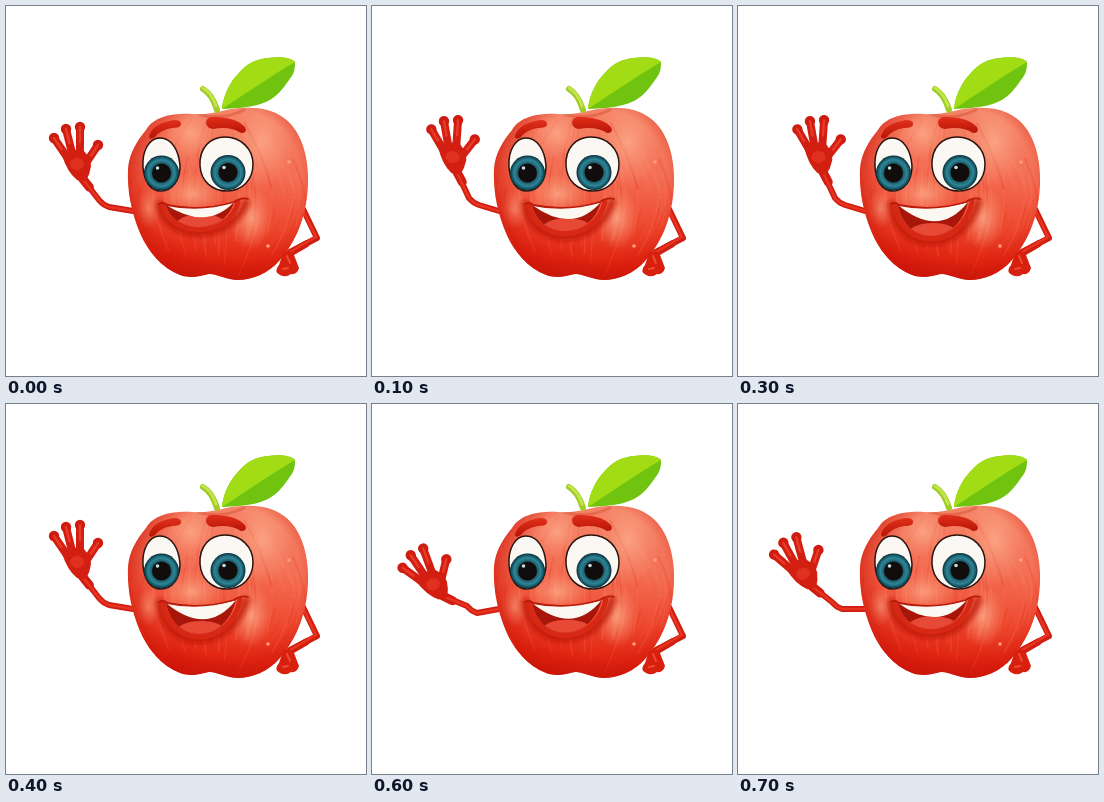
Animation, 360 px wide and 370 px high, one loop 0.8 s. Source, as an HTML page:

```html
<!DOCTYPE html>
<html lang="en">
<head>
<meta charset="utf-8">
<title>Waving apple</title>
<style>
html, body { margin: 0; width: 100%; height: 100%; overflow: hidden; background: #fff; }
svg { display: block; width: 360px; height: 370px; }
</style>
</head>
<body>
<svg viewBox="0 0 360 370" fill="none" stroke-linecap="round" stroke-linejoin="round">
  <defs>
    <linearGradient id="skin" x1=".55" y1="0" x2=".45" y2="1">
      <stop offset="0" stop-color="#f58468"/>
      <stop offset=".35" stop-color="#f36f55"/>
      <stop offset=".65" stop-color="#ee4a30"/>
      <stop offset=".88" stop-color="#e02410"/>
      <stop offset="1" stop-color="#c4150a"/>
    </linearGradient>
    <radialGradient id="edge" gradientUnits="userSpaceOnUse" cx="222" cy="176" r="106">
      <stop offset=".7" stop-color="#d81c0c" stop-opacity="0"/>
      <stop offset="1" stop-color="#cc1408" stop-opacity=".75"/>
    </radialGradient>
    <radialGradient id="glow">
      <stop offset="0" stop-color="#fbab8a" stop-opacity=".8"/>
      <stop offset="1" stop-color="#fb9b7a" stop-opacity="0"/>
    </radialGradient>
    <radialGradient id="iris">
      <stop offset=".5" stop-color="#16525f"/>
      <stop offset=".75" stop-color="#2f8596"/>
      <stop offset=".88" stop-color="#1b6070"/>
      <stop offset="1" stop-color="#082a33"/>
    </radialGradient>
    <linearGradient id="brow" x1="0" y1="0" x2="0" y2="1">
      <stop offset="0" stop-color="#e0301b"/>
      <stop offset="1" stop-color="#b81406"/>
    </linearGradient>
    <filter id="soft" x="-30%" y="-30%" width="160%" height="160%"><feGaussianBlur stdDeviation="2.500"/></filter>
    <path id="body" d="M140 124C148 110 168 107 186 108C198 109 206 107 216 105C238 100 262 100 278 112C297 126 303 154 302 178C301 206 293 232 274 254C262 268 246 274 232 274C220 274 212 268 203 268C194 270 185 273 174 269C156 262 142 246 134 227C125 206 121 184 122 163C123 148 130 136 140 124Z"/>
    <clipPath id="inBody"><use href="#body"/></clipPath>
    <clipPath id="inMouth"><path id="mouthClip"/></clipPath>
    <g id="eyeball">
      <circle r="17.500" fill="url(#iris)"/>
      <circle r="9.500" fill="#120d0d"/>
      <circle cx="-4" cy="-5" r="1.800" fill="#c4dfe2"/>
    </g>
  </defs>

  <!-- resting arm -->
  <path d="M297 203L311 232L284 246" stroke="#cf1f10" stroke-width="6"/>
  <path d="M300 238L281 249" stroke="#cf1f10" stroke-width="7"/>
  <path d="M297 204L310 231L284 246" stroke="#ea3420" stroke-width="2.500"/>

  <!-- waving arm -->
  <path id="arm" stroke="#d01d10" stroke-width="6"/>
  <path id="wrist" stroke="#d01d10" stroke-width="9"/>
  <path id="armLight" stroke="#e63322" stroke-width="2.500"/>
  <g id="hand"></g>

  <!-- leaf: light half over dark half -->
  <path d="M216 103C217 90 224 76 232 68C241 57 251 53 262 52C274 50 286 52 289 56C289 64 288 68 283 74C277 83 270 91 262 95C248 102 232 102 216 103Z" fill="#70c410"/>
  <path d="M216 103C217 90 224 76 232 68C241 57 251 53 262 52C274 50 286 52 289 56C268 68 245 84 216 103Z" fill="#a2dc14"/>

  <use href="#body" fill="url(#skin)"/>
  <g clip-path="url(#inBody)">
    <g id="streaks"></g>
    <ellipse cx="256" cy="136" rx="32" ry="45" fill="url(#glow)"/>
    <ellipse cx="185" cy="128" rx="26" ry="26" fill="url(#glow)"/>
    <ellipse cx="186" cy="188" rx="32" ry="22" fill="url(#glow)"/>
    <ellipse cx="245" cy="212" rx="22" ry="32" fill="url(#glow)"/>
    <ellipse cx="142" cy="203" rx="13" ry="20" fill="url(#glow)"/>
    <use href="#body" fill="url(#edge)"/>
    <path d="M190 107Q212 116 238 104" stroke="#c83d20" stroke-opacity=".35" stroke-width="3"/>
  </g>
  <path d="M197 83Q206 88 211 104" stroke="#a0cc28" stroke-width="6"/>
  <path d="M197 82Q206 87 210 100" stroke="#c2e44c" stroke-width="3"/>
  <g fill="#ff9c82">
    <circle cx="283" cy="156" r="1.800"/><circle cx="262" cy="240" r="1.800"/>
  </g>

  <!-- fist on the hip -->
  <path d="M277 247Q284 243 288 249L293 262Q291 269 285 268Q280 272 274 269Q267 266 273 259Z" fill="#d8200f"/>
  <path d="M277 263L282 262M281 250L284 257" stroke="#ee4a34" stroke-width="2"/>

  <!-- brows -->
  <path d="M143 130Q147 117 168 114Q176 114 175 119Q174 122 166 122Q154 124 149 131Q143 135 143 130Z" fill="url(#brow)"/>
  <path d="M200 116Q201 110 211 111Q231 112 239 121Q242 127 235 127Q224 120 207 123Q200 122 200 116Z" fill="url(#brow)"/>

  <!-- eyes -->
  <g fill="#fbf8f3" stroke="#2a120d" stroke-width="1.500">
    <path d="M137 161C136 145 143 132 154 132C166 132 173 145 174 160C174 175 166 185 155 185C144 185 138 175 137 161Z"/>
    <path d="M194 160C193 142 204 131 219 131C235 131 247 143 247 158C247 174 236 185 221 185C206 185 195 175 194 160Z"/>
  </g>
  <use href="#eyeball" x="155.500" y="167"/>
  <use href="#eyeball" x="222" y="166.500"/>

  <!-- mouth -->
  <g filter="url(#soft)">
    <path id="shade" stroke="#bb1405" stroke-opacity=".8" stroke-width="7"/>
  </g>
  <path id="lip" stroke="#d62814" stroke-width="5"/>
  <g clip-path="url(#inMouth)">
    <rect x="150" y="185" width="95" height="55" fill="#a81509"/>
    <ellipse id="tongue" cx="195" rx="25" ry="11" fill="#e64a37"/>
    <path id="teeth" fill="#fbf8f2"/>
  </g>
  <path d="M153 198Q157 195 161 199Q194 206 228 196Q235 191 242 193" stroke="#b81a0c" stroke-width="1.800"/>
</svg>
<script>
const $ = id => document.getElementById(id);
const set = (id, attrs) => { for (const k in attrs) $(id).setAttribute(k, attrs[k]); };

// Hand, drawn around the middle of the palm
const tips = [[-24, -26], [-12, -35], [2, -37], [20, -19]];
const roots = [[-9, -4], [-5, -7], [2, -7], [6, 2]];
const finger = ([x, y], i) => {
  const [a, b] = roots[i];
  return `<path d="M${a} ${b}L${x} ${y}" stroke="#d21f12" stroke-width="8"/>
    <circle cx="${x}" cy="${y}" r="5.2" fill="#cf1c10"/>
    <path d="M${(a + x) / 2} ${(b + y) / 2}L${x} ${y}" stroke="#e83a28" stroke-width="2.5"/>`;
};
$('hand').innerHTML =
  '<path d="M-16 -9Q-5 -17 6 -13Q13 -5 13 2Q12 10 8 17L-1 16Q-11 8 -16 -9Z" fill="#d21f12"/>' +
  tips.map(finger).join('') +
  '<ellipse cx="-1" cy="0" rx="7" ry="6" fill="#e03020"/>';

// Fine grain of the skin
let seed = 7;
const rnd = () => (seed = seed * 16807 % 2147483647) / 2147483647;
let grain = '';
for (let i = 0; i < 75; i++) {
  const u = rnd() * 2 - 1, y = 105 + rnd() * 110, h = 20 + rnd() * 50;
  const at = v => 212 + u * 90 * Math.sin(Math.PI * (v - 80) / 225);
  grain += `<path d="M${at(y)} ${y}Q${at(y + h / 2)} ${y + h / 2} ${at(y + h)} ${y + h}"
    stroke="${rnd() < .5 ? '#ff9478' : '#d92a14'}" stroke-opacity=".16" stroke-width="${.8 + rnd() * 1.4}"/>`;
}
$('streaks').innerHTML = grain;

// Wave from lowest to highest: palm x, y, turn, elbow x, y
const poses = [
  [62, 180, -20, 99, 206],
  [66, 169.5, -15, 98, 202],
  [72, 158, 0, 97, 198],
  [81.5, 151, 4, 101, 196],
  [91.5, 143, 12, 103, 194]
];
const wave = [2, 3, 4, 3, 2, 1, 0, 1];
const smile = [0, .45, .85, 1, 1, 1, .85, .45];

function draw(step) {
  const [x, y, turn, ex, ey] = poses[wave[step]];
  const a = turn * Math.PI / 180, c = Math.cos(a), s = Math.sin(a);
  const wx = x + 4 * c - 14 * s, wy = y + 4 * s + 14 * c;
  const arm = `M127 205L${ex + 6} ${ey + 3}Q${ex} ${ey + 1} ${ex - 4} ${ey - 4}L${wx} ${wy}`;
  set('arm', { d: arm });
  set('armLight', { d: arm });
  set('wrist', { d: `M${wx + (ex - wx) * .35} ${wy + (ey - wy) * .35}L${wx} ${wy}` });
  set('hand', { transform: `translate(${x} ${y}) rotate(${turn})` });

  const m = smile[step], low = 221 + 9 * m, right = 228 + 2 * m;
  const top = `M160 199Q194 206 ${right} 196`;
  // Curve whose middle lies at the given height
  const jaw = (mid, l, r) => {
    const cy = (mid - 49.4) / .75;
    return `C${r} ${cy} ${l} ${cy} `;
  };
  set('mouthClip', { d: `${top}${jaw(low, 168, 219)}160 199Z` });
  set('lip', { d: `M${right + 4} 196${jaw(low + 3, 165, 223)}157 199` });
  set('shade', { d: `M240 196${jaw(low + 6, 158, 226)}153 198` });
  set('tongue', { cy: low - 2 });
  set('teeth', { d: `${top}Q201 ${225 + 8 * m} 160 199Z` });
}

function tick(now) {
  draw(Math.floor(now / 100) % 8);
  requestAnimationFrame(tick);
}
draw(0);
requestAnimationFrame(tick);
</script>
</body>
</html>
```
